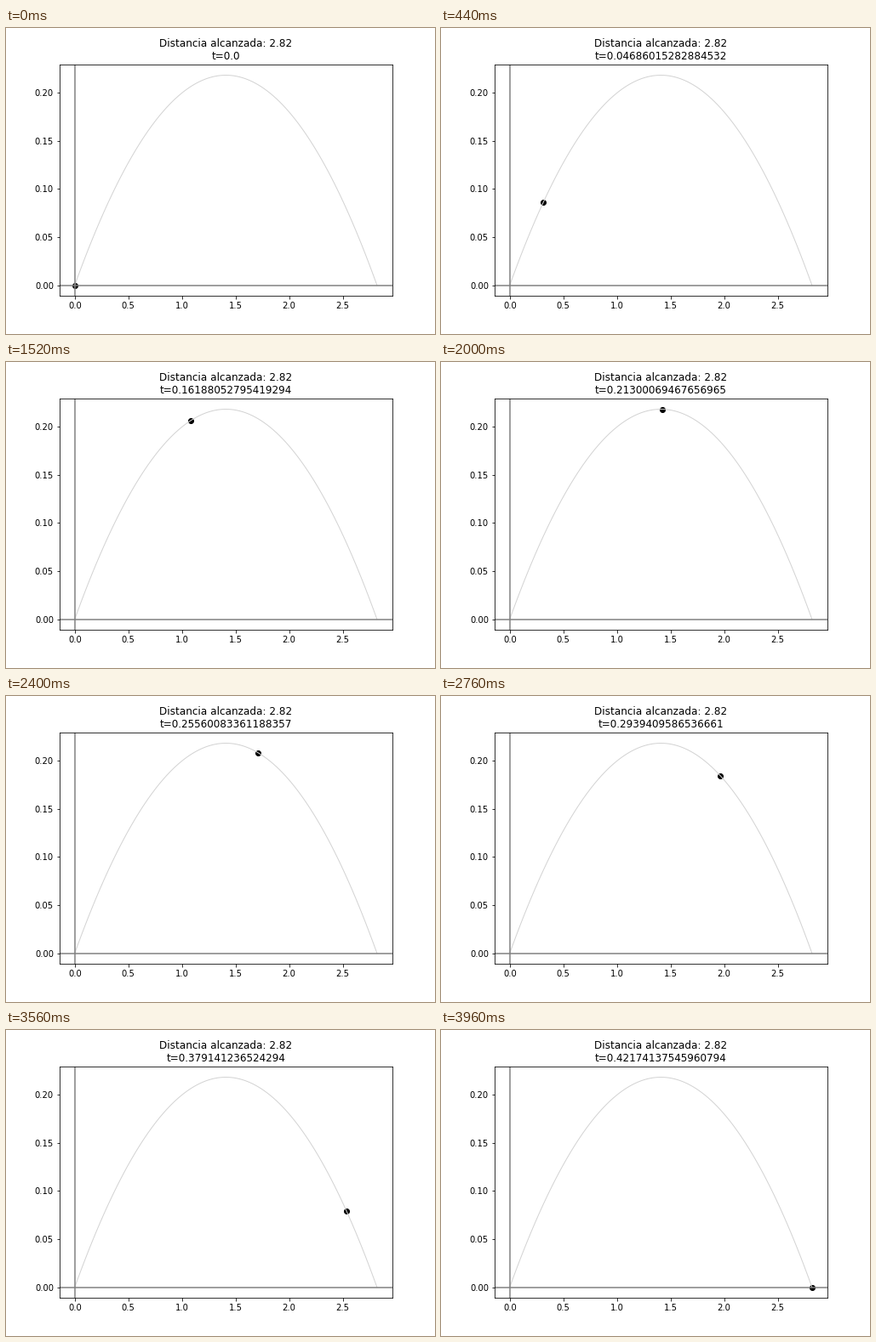
Animation of 504 by 360 pixels, one loop 4000 ms. Source, as a matplotlib script:

```python
import matplotlib.pyplot as plt
import numpy as np
from matplotlib.animation import FuncAnimation

G = 9.81
SPEED = 7
ANGLE = 0.3
FLIGHT = 0.42174137545960794  # 2 * SPEED * sin(ANGLE) / G
FRAMES = 100

times = np.linspace(0, FLIGHT, FRAMES)
xs = SPEED * np.cos(ANGLE) * times
ys = SPEED * np.sin(ANGLE) * times - G * times**2 / 2

plt.rcParams["font.family"] = "DejaVu Sans"
fig, ax = plt.subplots(figsize=(7, 5), dpi=72, facecolor="white")
fig.subplots_adjust(left=0.125, right=0.9, bottom=0.125, top=0.88)

ax.plot(xs, ys, color="lightgray", lw=1)
ax.axhline(0, color="gray")
ax.axvline(0, color="gray")
ball = ax.scatter([xs[0]], [ys[0]], color="black")
title = ax.set_title("")


def draw(i):
    ball.set_offsets([[xs[i], ys[i]]])
    title.set_text(f"Distancia alcanzada: {xs[-1]:.2f}\nt={times[i]}")
    return ball, title


anim = FuncAnimation(fig, draw, frames=FRAMES, interval=40, repeat=True,
                     repeat_delay=0, init_func=lambda: draw(0))
plt.show()
```
